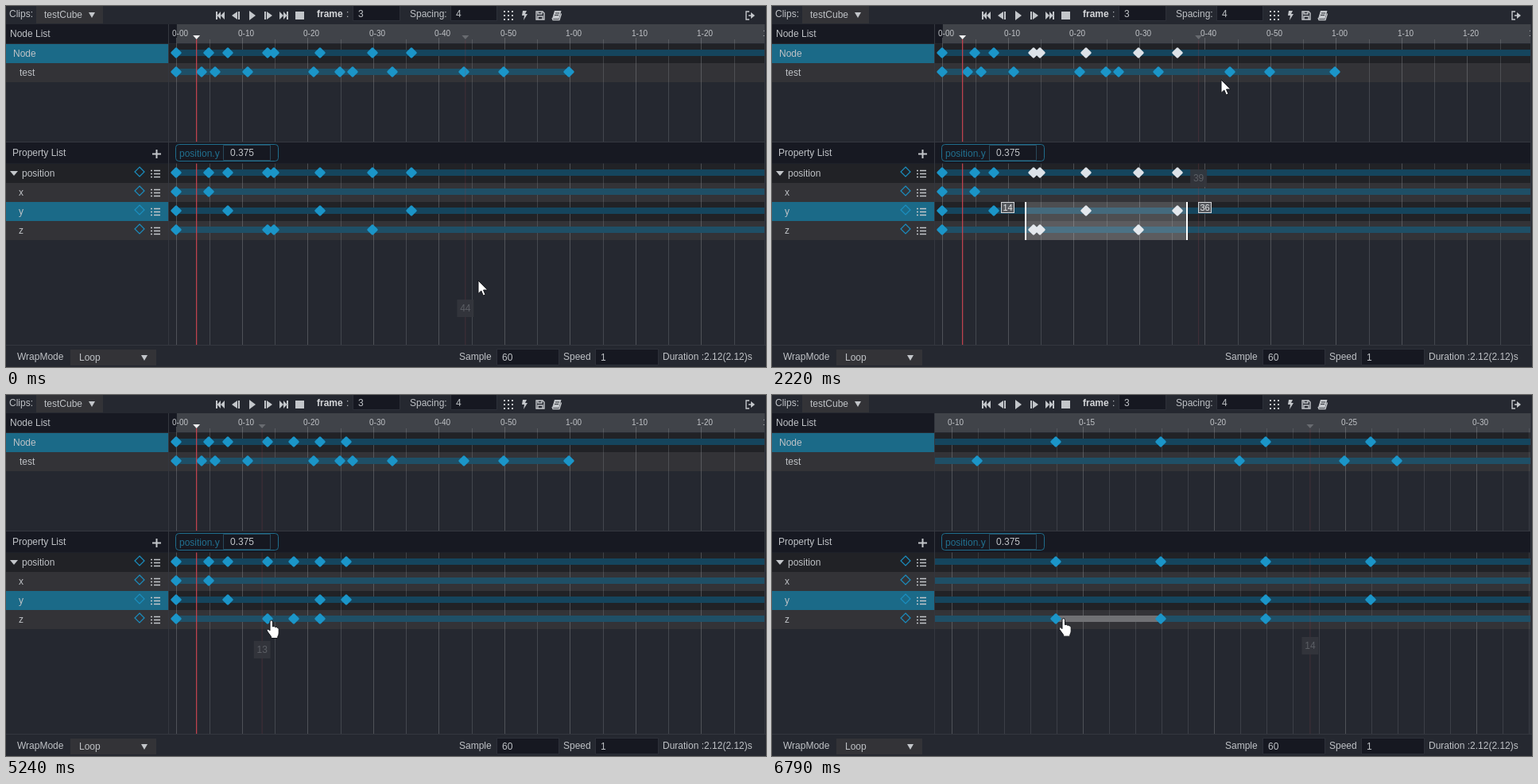
An HTML page that plays this animation: 956 by 455 pixels, repeating every 6.94 s.

```html
<!DOCTYPE html>
<html lang="en">
<head>
<meta charset="utf-8">
<title>Timeline editor</title>
<style>
html, body { margin: 0; width: 100%; height: 100%; overflow: hidden; background: #252830; }
svg { display: block; width: 956px; height: 455px; }
text { font: 12px "Liberation Sans", Arial, sans-serif; fill: #bfc2c6; white-space: pre; }
.small { font-size: 10px; }
.head { fill: #171922; }
.dark { fill: #212226; }
.light { fill: #333337; }
.active { fill: #1b6a88; }
.input { fill: #161821; stroke: #2d3039; }
.icon { fill: #c3c6ca; }
.line { fill: none; stroke: #c3c6ca; stroke-width: 1.4; }
.add { fill: none; stroke: #1b8fc0; stroke-width: 1.2; }
</style>
</head>
<body>
<svg viewBox="0 0 956 455">
  <defs>
    <clipPath id="view"><path d="M205 23H954V427H205z"/></clipPath>
    <path id="key" d="M-1 -6.3Q0 -7.2 1 -6.3L6.3 -1Q7.2 0 6.3 1L1 6.3Q0 7.2 -1 6.3L-6.3 1Q-7.2 0 -6.3 -1z"/>
    <path id="arrow" d="M1 0V16.5L4.8 13L7.3 19L10 17.8L7.5 12H12.8z" fill="#fff" stroke="#15171c"/>
    <path id="hand" d="M1 2Q1 0 2.7 0Q4.5 0 4.5 2V8Q6.5 6.7 7.5 8.6Q9.5 7.6 10.2 9.4Q12.2 9 12.2 11.5V16Q12.2 18.5 10.8 20.5V22.5H2.6V20.6L-2.2 14Q-3.6 11.8 -2 11.2Q-.8 10.8 1 13z" fill="#fff" stroke="#15171c"/>
    <g id="rowTools">
      <path class="add" d="M168 -8L174 -2L168 4L162 -2z"/>
      <path class="line" d="M182 -3.500h2m2 0h8M182 .5h2m2 0h8M182 4.500h2m2 0h8"/>
    </g>
  </defs>

  <path fill="#252830" d="M0 0H956V455H0z"/>
  <path class="head" d="M0 23H204V47H0z"/>
  <path class="active" d="M0 48H204V72H0zM0 247H204V271H0z"/>
  <path class="light" d="M0 72H204V96H0zM0 223H204V247H0zM0 271H204V295H0z"/>
  <path class="dark" d="M0 199H204V223H0z"/>

  <g id="tracks" clip-path="url(#view)"></g>

  <path class="head" d="M0 172H954V198.500H0z"/>
  <path fill="none" stroke="#34373f" d="M0 171.500H954M204.500 23V427M0 427.500H956M954.500 23V427"/>

  <text x="4" y="14">Clips:</text>
  <path class="light" d="M38 0H122V22H38z"/>
  <text x="48" y="15">testCube</text>
  <path class="icon" d="M104 8h8l-4 7z"/>

  <g class="icon">
    <path d="M264 7h2v10h-2zM270 7v10l-4.500-5zM275 7v10l-5-5z"/>
    <path d="M291 7v10l-7-5zM292 7h2v10h-2z"/>
    <path d="M306 6l8 6l-8 6z"/>
    <path d="M325 7h2v10h-2zM328 7v10l7-5z"/>
    <path d="M344 7v10l5-5zM349 7v10l4.500-5zM353 7h2v10h-2z"/>
    <path d="M364 7h11v10h-11z"/>
    <path d="M650 6h5l-2 4h3l-5 8l1-6h-3z"/>
    <path d="M690 6h8.500l-3 10h-8.500z"/>
  </g>
  <path stroke="#c3c6ca" stroke-width="2" stroke-dasharray="2 3" d="M626 7h12M626 12h12M626 17h12"/>
  <path class="line" d="M667 7h8l2 2v8h-10zM669 7v3h5v-3M669 17v-4h6v4M687 15l1 2.500h8l2.500-8M935 7h-4v10h4M934 12h5"/>
  <path class="icon" d="M937 8l5 4l-5 4z"/>
  <path stroke="#33363c" d="M691 9h5M690 11.500h5"/>

  <path class="input" d="M436.500 -1H495.500V18.500H436.500zM559.500 -1H617.500V18.500H559.500zM617.500 432.500H695.500V452.500H617.500zM741.500 432.500H820.500V452.500H741.500z"/>
  <text x="391" y="14" style="font-weight:bold;fill:#d5d7da">frame</text>
  <text x="428" y="14">:</text>
  <text x="443" y="14">3</text>
  <text x="508" y="14">Spacing:</text>
  <text x="566" y="14">4</text>

  <text x="5" y="39">Node List</text>
  <text x="9" y="64">Node</text>
  <text x="17" y="88">test</text>
  <text x="8" y="189">Property List</text>
  <path class="line" style="stroke-width:2" d="M184 186.500h11M189.500 181v11"/>
  <rect x="213.500" y="174.500" width="129" height="21" rx="4" fill="none" stroke="#1f6d8c"/>
  <text x="218" y="190" style="fill:#216f8e">position.y</text>
  <path class="input" style="stroke:#29485a" d="M273.500 175.500H332.500V194.500H273.500z"/>
  <text x="282" y="189">0.375</text>

  <path class="icon" d="M5 208h10l-5 6z"/>
  <text x="20" y="215">position</text>
  <text x="16" y="239">x</text>
  <text x="16" y="263">y</text>
  <text x="16" y="287">z</text>
  <use href="#rowTools" y="211"/>
  <use href="#rowTools" y="235"/>
  <use href="#rowTools" y="259"/>
  <use href="#rowTools" y="283"/>

  <text x="14" y="446">WrapMode</text>
  <path class="light" d="M81 433H189V453H81z"/>
  <path class="icon" d="M170 440h8l-4 7z"/>
  <text x="92" y="447">Loop</text>
  <text x="570" y="446">Sample</text>
  <text x="624" y="447">60</text>
  <text x="701" y="446">Speed</text>
  <text x="748" y="447">1</text>
  <text x="826" y="446">Duration :2.12(2.12)s</text>

  <g id="overlay"></g>
</svg>
<script>
const LOOP = 6940, TICKS = 90;
const LEFT = 205, RIGHT = 954, ORIGIN = 214.9, BASE_SCALE = 8.249;
const PRESS = 1, RELEASE = 17, CLICK = 48, RESPACE = 49;
const DRAG_START = { x: 593, y: 346 };

// [tick, x, y]
const pointerKeys = [
  [-1, 581, 347], [0, 593, 346], [1, 593, 346], [3, 560, 336], [5, 430, 296],
  [7, 317, 257], [8, 294, 245], [9, 268, 243], [14, 268, 243], [15, 283, 246],
  [16, 300, 255], [24, 300, 255], [25, 310, 250], [28, 540, 183], [29, 564, 93],
  [33, 575, 30], [34, 578, 26], [41, 629, 12], [54, 629, 12], [57, 520, 258],
  [61, 280, 300], [62, 330, 330], [65, 362, 320], [67, 324, 287], [68, 331, 284],
  [72, 321, 330], [73, 321, 343], [84, 321, 343], [87, 364, 282], [90, 364, 281]
];
// [tick, pixels per frame, x of frame zero]
const zoomKeys = [
  [72, BASE_SCALE, ORIGIN], [73, 8.76, 208.2], [76, 12.5, 159.4],
  [78, 14.5, 133.6], [79, 14.5, 133.6], [84, 33, -104]
];

function track(keys, t, channel = 1) {
  const next = keys.findIndex(k => k[0] > t);
  if (next === 0) return keys[0][channel];
  if (next < 0) return keys[keys.length - 1][channel];
  const a = keys[next - 1], b = keys[next];
  return a[channel] + (b[channel] - a[channel]) * (t - a[0]) / (b[0] - a[0]);
}
const pointer = t => ({ x: track(pointerKeys, t), y: track(pointerKeys, t, 2) });
const scaleAt = t => track(zoomKeys, t);

const rect = (x, y, w, h, attrs) =>
  `<rect x="${x}" y="${y}" width="${Math.max(0, w)}" height="${h}" ${attrs}/>`;
const vline = (x, y1, y2, attrs) => `<path d="M${x} ${y1}V${y2}" ${attrs}/>`;
const label = (x, y, value, attrs = "") => `<text class="small" x="${x}" y="${y}" ${attrs}>${value}</text>`;
const union = (...lists) => [...new Set(lists.flat())].sort((a, b) => a - b);

function buildRows(t) {
  const spaced = t >= RESPACE;
  const x = [0, 5];
  const y = spaced ? [0, 8, 22, 26] : [0, 8, 22, 36];
  const z = spaced ? [0, 14, 18, 22] : [0, 14, 15, 30];
  const all = union(x, y, z);
  return [
    { y: 59, keys: all, summary: true },
    { y: 83, keys: [0, 4, 6, 11, 21, 25, 27, 33, 44, 50, 60], light: true, ends: true },
    { y: 210, keys: all, summary: true },
    { y: 234, keys: x, light: true, property: true },
    { y: 258, keys: y, property: true },
    { y: 282, keys: z, light: true, property: true }
  ];
}

function drawGrid(scale, gridX) {
  let out = "";
  const labelStep = scale * 5 > 50 ? 5 : 10;
  const first = Math.floor((LEFT - gridX(0)) / scale) - 1;
  const last = Math.ceil((RIGHT - gridX(0)) / scale);
  for (let f = Math.max(0, first); f <= last; f++) {
    const span = scale * (f % 10 === 0 ? 10 : f % 5 === 0 ? 5 : 1);
    const alpha = Math.min(1, Math.max(0, (span - 9) / 32));
    const x = Math.floor(gridX(f)) + .5;
    if (alpha > 0) {
      out += vline(x, f % labelStep ? 42 : 40, 427,
        `stroke="#a0a3a8" stroke-opacity="${alpha * (span > 60 ? .34 : .25)}"`);
    }
    if (f % labelStep === 0) {
      out += label(x - 5.500, 38, `${Math.floor(f / 60)}-${String(f % 60).padStart(2, "0")}`);
    }
  }
  return out;
}

function drawHover(t, scale, gridX, at) {
  if (t >= PRESS && t <= 25 || at.y < 23) return "";
  const frame = Math.round((at.x - gridX(0)) / scale);
  // The marker ignores panning and keeps its place while only the wheel turns.
  const x = ORIGIN + frame * (t < 85 ? scaleAt(Math.min(t, 73)) : scaleAt(t - 1));
  const y = at.y + 34;
  return vline(x, 43, 427, 'stroke="#94454f" stroke-opacity=".28"') +
    `<path d="M${x - 4.500} 37h9l-4.500 5z" fill="#686b70"/>` +
    rect(x - 10.500, y - 11, 21, 22, 'fill="#33363c" fill-opacity=".9"') +
    `<text x="${x}" y="${y + 4}" text-anchor="middle" style="fill:#5c5f65">${frame}</text>`;
}

function drawSelection(selected, keyX) {
  const frames = union(...selected.map(s => s.frames));
  if (!frames.length) return "";
  const top = Math.min(...selected.map(s => s.y)) - 11;
  const bottom = Math.max(...selected.map(s => s.y)) + 13;
  const min = frames[0], max = frames[frames.length - 1];
  const x1 = keyX(min) - 10, x2 = keyX(max) + 12;
  const tag = (right, value) => {
    const w = String(value).length > 1 ? 16 : 10;
    return rect(right - w + .5, top + .5, w, 13, 'fill="#55585d" stroke="#d5d7da"') +
      label(right - w / 2 + .5, top + 11, value, 'text-anchor="middle" style="fill:#e4e6e8;font-size:11px"');
  };
  return rect(x1, top, x2 - x1, bottom - top, 'fill="#fff" fill-opacity=".2"') +
    vline(x1, top, bottom, 'stroke="#fff" stroke-width="2"') +
    vline(x2, top, bottom, 'stroke="#fff" stroke-width="2"') +
    tag(keyX(min) - 25, min) + tag(keyX(max) + 42, max);
}

function draw(t) {
  const scale = scaleAt(t), start = track(zoomKeys, t, 2);
  const gridX = f => start + f * scale;
  const keyX = f => Math.floor(gridX(f) - .9 + 1e-6);
  const cursor = pointer(t), before = pointer(t - 1);
  const rows = buildRows(t);

  const dragging = t >= PRESS && t < RELEASE;
  const corner = dragging ? before : pointer(RELEASE);
  const hasSelection = t >= PRESS && t < RESPACE;
  const isPicked = (row, f) => hasSelection && row.property && row.y + 7 > corner.y &&
    keyX(f) > corner.x && keyX(f) < DRAG_START.x;
  const selected = rows
    .map(row => ({ y: row.y, frames: row.keys.filter(f => isPicked(row, f)) }))
    .filter(s => s.frames.length);
  const picked = selected.flatMap(s => s.frames);

  const rulerX = Math.max(LEFT, start);
  let out = rect(LEFT, 23, 749, 24, 'class="head"') +
    rect(rulerX, 23, RIGHT - rulerX, 24, 'fill="#404349"');
  for (const row of rows) out += rect(LEFT, row.y - 11, 749, 24, `class="${row.light ? "light" : "dark"}"`);
  out += drawGrid(scale, gridX);

  let keys = "", overKey = false;
  for (const row of rows) {
    const from = Math.max(LEFT, keyX(0));
    const to = row.ends ? Math.min(RIGHT, keyX(60)) : RIGHT;
    out += rect(from, row.y - 4, to - from, 8, `fill="${row.light ? "#1f4f66" : "#15455d"}"`);
    if (row.property && Math.abs(before.y - row.y) < 5) {
      const i = row.keys.findLastIndex(f => keyX(f) <= before.x);
      if (i >= 0) {
        const a = keyX(row.keys[i]);
        const b = i + 1 < row.keys.length ? keyX(row.keys[i + 1]) : RIGHT;
        out += rect(a, row.y - 4, b - a, 8, 'fill="#707174"');
      }
    }
    for (const f of row.keys) {
      const white = row.summary ? picked.includes(f) : isPicked(row, f);
      keys += `<use href="#key" x="${keyX(f)}" y="${row.y}" fill="${white ? "#dde2e8" : "#1b95c8"}"/>`;
      overKey ||= Math.abs(cursor.x - keyX(f)) < 9 && Math.abs(cursor.y - row.y) < 8;
    }
  }
  out += keys;

  const head = gridX(3);
  out += vline(head, 42, 427, 'stroke="#c8444f" stroke-width="1.2"') +
    `<path d="M${head - 4.500} 37h9l-4.500 5z" fill="#f0f1f2"/>`;
  out += drawHover(t, scale, gridX, before) + drawSelection(selected, keyX);
  if (dragging) {
    out += rect(corner.x + .5, corner.y + .5, DRAG_START.x - corner.x - 1, DRAG_START.y - corner.y - 1,
      'fill="#7f98a8" fill-opacity=".2" stroke="#6f93b5"');
  }

  const overButton = cursor.y < 22 && Math.abs(cursor.x - 632) < 9;
  let top = "";
  if (dragging || t === CLICK) {
    top += `<circle cx="${cursor.x}" cy="${cursor.y}" r="15" fill="#b8b01c" fill-opacity=".8"/>`;
  }
  top += `<use href="#${overButton || overKey ? "hand" : "arrow"}" x="${cursor.x}" y="${cursor.y}"/>`;

  document.getElementById("tracks").innerHTML = out;
  document.getElementById("overlay").innerHTML = top;
}

let shown = -1;
function play() {
  const time = performance.now() % LOOP;
  const tick = Math.min(TICKS - 1, Math.floor(time / LOOP * TICKS + .22));
  if (tick !== shown) draw(shown = tick);
  requestAnimationFrame(play);
}
play();
</script>
</body>
</html>
```
